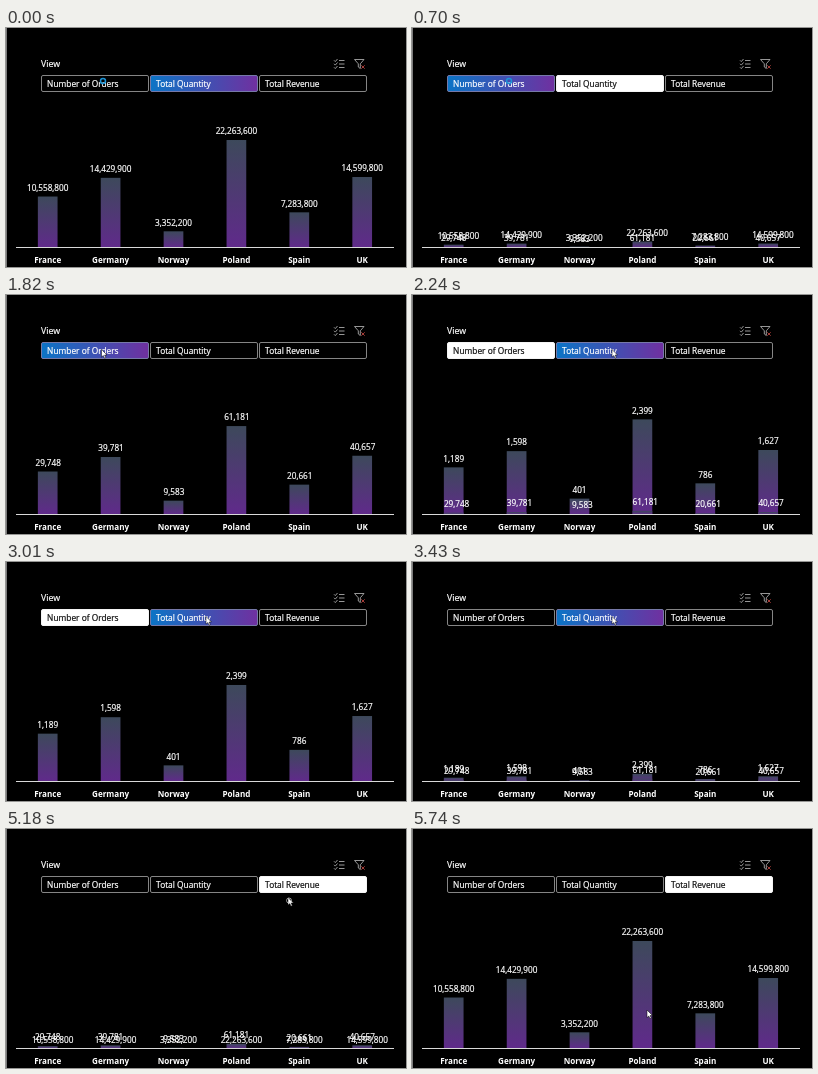
Write an HTML page that moves like this. It is 400 by 239 pixels and loops after 5810 ms.

```html
<!DOCTYPE html>
<html lang="en">
<head>
<meta charset="utf-8">
<title>Orders by country</title>
<style>
  html, body { margin: 0; width: 400px; height: 239px; overflow: hidden; background: #000; }
  svg { display: block; }
  text { font: 8.35px "Open Sans", "Noto Sans", sans-serif; fill: currentColor; stroke: currentColor; stroke-width: .22; color: #fff; }
  .value { font-size: 8.2px; text-anchor: middle; }
  .country { font-size: 8.1px; font-weight: 700; text-anchor: middle; stroke: none; }
  .button rect { fill: #000; stroke: #858585; }
  .button.hover rect { fill: url(#hover); stroke: #7679a8; }
  .button.picked rect { fill: #fff; stroke: #f4f4f4; }
  .button.picked text { color: #111; }
  .icon { fill: none; stroke: #a8a8a8; stroke-width: .9; }
</style>
</head>
<body>
<svg id="stage" width="400" height="239" viewBox="0 0 400 239">
  <defs>
    <linearGradient id="hover"><stop stop-color="#0b74c6"/><stop offset="1" stop-color="#7030a0"/></linearGradient>
    <linearGradient id="bar" x2="0" y2="1"><stop stop-color="#3d495b"/><stop offset="1" stop-color="#602a8b"/></linearGradient>
  </defs>
  <path d="M.5 0V239" stroke="#7c7c7c"/>
  <text x="35" y="39" style="font-size:8.8px">View</text>
  <g class="icon">
    <path d="M333 32.5h5.5M333 36h5.5M333 39.5h5.5M328 32.3l1.3 1.3 2.2-2.6M328 35.8l1.3 1.3 2.2-2.6M328 39.3l1.3 1.3 2.2-2.6"/>
    <path d="M348.5 31.5h9.5l-3.7 4.3v4.7l-2-1.5v-3.2z"/>
    <path d="M355.3 37.3l3.4 3.4m0-3.4l-3.4 3.4" stroke="#b8433f"/>
  </g>
  <g id="slicer"></g>
  <g id="bars"></g>
  <path d="M10 219.5H388" stroke="#d9d9d9"/>
  <g id="labels"></g>
  <g id="cursor">
    <path id="arrow" d="M0 0V7.6L1.8 6 3 8.7 4.3 8.1 3.1 5.5H5.5Z" fill="#fff" stroke="#000" stroke-width=".5"/>
    <circle id="ring" r="2.5" fill="none" stroke-width="1.5"/>
  </g>
</svg>
<script>
const LOOP = 5810, STEP = 70, BASE = 219.5, PLOT = 120.7, BAR = 19.7;
const $ = id => document.getElementById(id);
const middle = i => 41.7 + i * 62.9;

const series = {
  orders: { max: 3000, wide: 0, values: [1189, 1598, 401, 2399, 786, 1627] },
  quantity: { max: 70000, wide: 3, values: [29748, 39781, 9583, 61181, 20661, 40657] },
  revenue: { max: 25e6, wide: 5, values: [10558800, 14429900, 3352200, 22263600, 7283800, 14599800] }
};

// the old series drops from start to low, the new one rises from up to end
const changes = [
  { from: 'revenue', to: 'quantity', start: 70, low: 900, up: 650, end: 1060, clear: 1110 },
  { from: 'quantity', to: 'orders', start: 1500, low: 2432, up: 1900, end: 2302, clear: 2460 },
  { from: 'orders', to: 'quantity', start: 3190, low: 3519, up: 3320, end: 3900, clear: 3950 },
  { from: 'quantity', to: 'revenue', start: 4800, low: 5290, up: 5170, end: 5700, clear: 5720 }
];

// one letter per button: h hover, p picked, - plain
const slicerStates = [
  [0, '-h-'], [700, 'hp-'], [1200, 'h--'], [2080, 'ph-'], [3140, '-h-'],
  [3960, '-ph'], [4620, '--h'], [4830, '--p']
];

const cursorPath = [
  [0, 97, 53], [700, 97, 53], [900, 95.5, 54.5], [1900, 95.5, 54.5], [2200, 200, 54.5],
  [3800, 200, 54.5], [4040, 279.5, 62], [4250, 281, 58], [4720, 281, 58], [4900, 282, 68.5],
  [5250, 282, 68.5], [5600, 235, 181], [LOOP, 235, 181]
];

function place(node, attrs) {
  for (const key in attrs) node.setAttribute(key, attrs[key]);
}

function add(parent, tag, attrs, text = '') {
  const node = document.createElementNS('http://www.w3.org/2000/svg', tag);
  place(node, attrs);
  node.textContent = text;
  parent.appendChild(node);
  return node;
}

const span = (t, a, b) => Math.min(1, Math.max(0, (t - a) / (b - a)));
const ease = p => p < .5 ? 4 * p ** 3 : 1 - 4 * (1 - p) ** 3;

const buttons = ['Number of Orders', 'Total Quantity', 'Total Revenue'].map((name, i) => {
  const x = 35.5 + i * 109, g = add($('slicer'), 'g', {});
  add(g, 'rect', { x, y: 47.5, width: 107, height: 16, rx: 1.5 });
  add(g, 'text', { x: x + 5.6, y: 58.7 }, name);
  return g;
});

['France', 'Germany', 'Norway', 'Poland', 'Spain', 'UK'].forEach((name, i) =>
  add($('labels'), 'text', { class: 'country', x: middle(i), y: 234.8 }, name));

for (const s of Object.values(series)) {
  s.bars = s.values.map((v, i) =>
    add($('bars'), 'rect', { x: middle(i) - BAR / 2, width: BAR, fill: 'url(#bar)' }));
  s.labels = s.values.map(v =>
    add($('labels'), 'text', { class: 'value' }, v.toLocaleString('en-US')));
}

function showSeries(name, level, shifted) {
  const s = series[name], shown = level !== undefined;
  s.values.forEach((v, i) => {
    s.bars[i].style.display = s.labels[i].style.display = shown ? '' : 'none';
    if (!shown) return;
    const height = v / s.max * PLOT * level;
    const shift = shifted ? s.wide * (1 - level) : 0;
    place(s.bars[i], { y: BASE - height, height });
    place(s.labels[i], { x: middle(i) + shift, y: BASE - height - 5.8 });
  });
}

function drawChart(t) {
  const c = changes.filter(item => item.start <= t).pop();
  const levels = {};
  if (!c) levels.revenue = 1;
  else {
    if (t >= c.up) levels[c.to] = ease(span(t, c.up, c.end));
    if (t < c.clear) levels[c.from] = 1 - ease(span(t, c.start, c.low));
  }
  for (const name in series) {
    const other = c && (name === c.to ? c.from : c.to);
    showSeries(name, levels[name], other && series[name].wide > series[other].wide);
  }
}

function drawCursor(t) {
  const i = cursorPath.findIndex(p => p[0] > t);
  const [t0, x0, y0] = cursorPath[i - 1], [t1, x1, y1] = cursorPath[i];
  const p = span(t, t0, t1), k = p * p * (3 - 2 * p);
  place($('cursor'), { transform: `translate(${x0 + (x1 - x0) * k} ${y0 + (y1 - y0) * k})` });
  const waiting = t < 850, busy = t >= 4830 && t < 5300;
  $('arrow').style.display = waiting ? 'none' : '';
  $('ring').style.display = waiting || busy ? '' : 'none';
  place($('ring'), busy
    ? { cx: 1, cy: 3, stroke: '#d8d8d8', 'stroke-width': .7 }
    : { cx: 0, cy: 0, stroke: '#1b93d6', 'stroke-width': 1.5 });
}

function draw(now) {
  const t = Math.floor(now % LOOP / STEP) * STEP;
  const state = slicerStates.filter(item => item[0] <= t).pop()[1];
  buttons.forEach((b, i) =>
    b.setAttribute('class', 'button ' + { h: 'hover', p: 'picked', '-': '' }[state[i]]));
  drawChart(t);
  drawCursor(t);
}

const begin = performance.now();
function tick() {
  draw(performance.now() - begin);
  requestAnimationFrame(tick);
}
tick();
</script>
</body>
</html>
```
